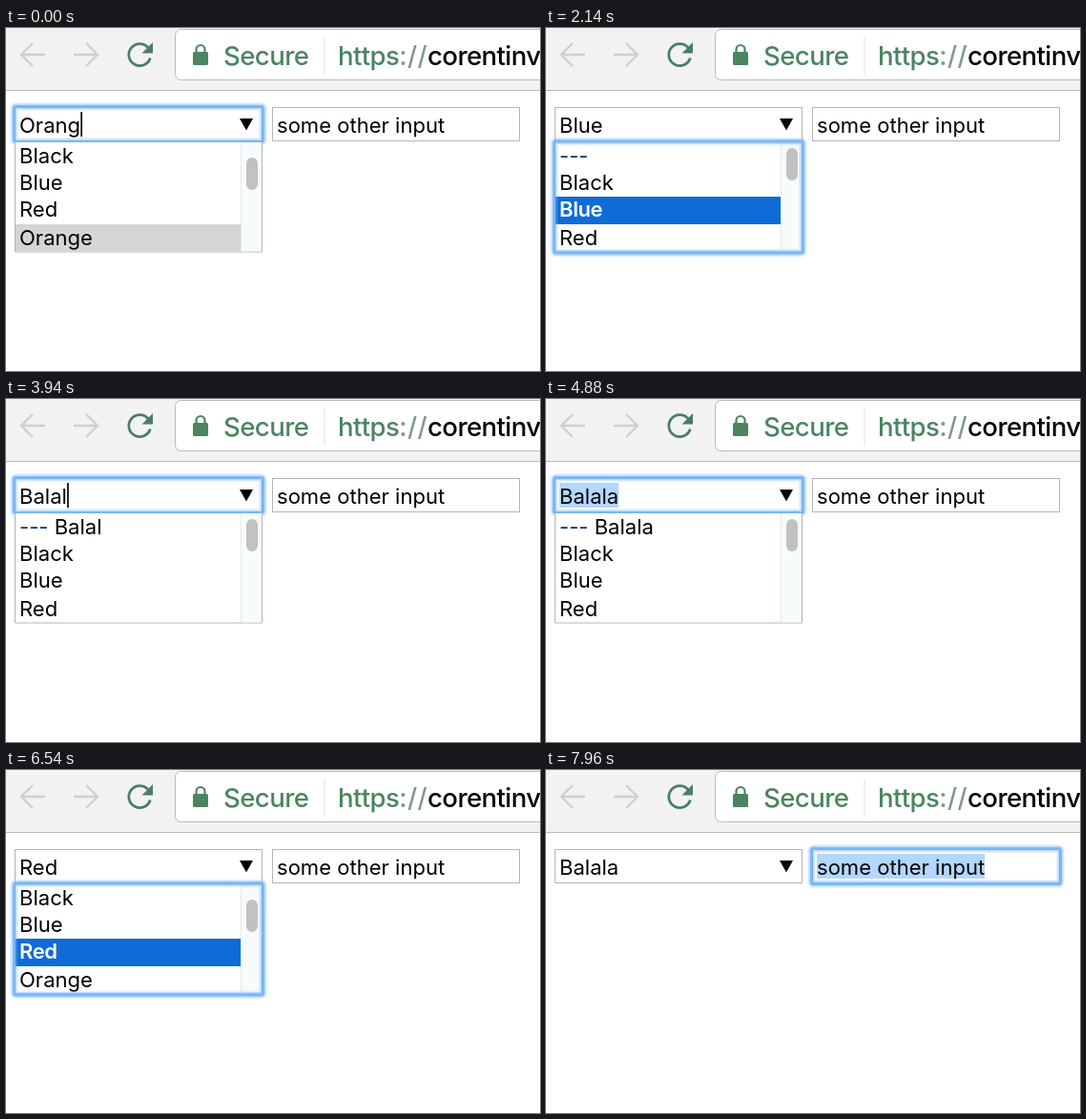
Write an HTML page that moves like this. It is 560 px wide and 360 px high and loops after 8000 ms.

```html
<!DOCTYPE html>
<html lang="en">
<head>
<meta charset="utf-8">
<title>Editable select</title>
<style>
  html, body { margin: 0; width: 100%; height: 100%; overflow: hidden; background: #fff; }
  svg { display: block; width: 560px; height: 360px; }
  text { font: 22.05px Inter, Roboto, sans-serif; white-space: pre; }
  .bar { font-size: 27.6px; font-weight: 500; letter-spacing: -.6px; }
  .bar tspan { letter-spacing: .3px; }
  .on { font-weight: 600; letter-spacing: -.4px; fill: #fff; }
  .dash { fill: #12365f; }
  .on .dash { fill: #fff; }
  .box { fill: #fff; stroke: #b4b4b4; }
  .ring rect { fill: none; stroke: #6fb1f5; }
</style>
</head>
<body>
<svg id="stage" viewBox="0 0 560 360">
  <rect width="560" height="65" fill="#f2f2f2"/>
  <rect y="65" width="560" height="1" fill="#b8b8b8"/>
  <g fill="none" stroke="#cfcfcf" stroke-width="2.4">
    <path d="M41 28H17M28 16L16 28L28 40"/>
    <path d="M71 28H95M84 16L96 28L84 40"/>
  </g>
  <path d="M149 20.500A11.5 11.5 0 1 0 151.3 31.500" fill="none" stroke="#4a7d68" stroke-width="2.700"/>
  <path d="M154 15V26.500H142.500Z" fill="#4a7d68"/>
  <rect x="177.500" y="1.500" width="400" height="53" rx="6" fill="#fff" stroke="#bababa"/>
  <rect x="196" y="25" width="16" height="14" rx="1.500" fill="#4a8560"/>
  <path d="M199.500 26V22.500a4.500 4.500 0 0 1 9 0V26" fill="none" stroke="#4a8560" stroke-width="2.200"/>
  <text class="bar" x="228" y="39" fill="#4a8560">Secure</text>
  <rect x="333.500" y="9" width="1" height="40" fill="#e4e4e4"/>
  <text class="bar" x="348" y="39" fill="#4a8560">https<tspan fill="#7f9a88">://</tspan></text>
  <text class="bar" x="442" y="39">corentinvau</text>

  <rect class="box" x="9.500" y="83.500" width="259" height="35"/>
  <rect class="box" x="279.500" y="83.500" width="259" height="35"/>
  <rect id="pick" y="88" height="26" fill="#b3d7fe"/>
  <text id="value" x="14" y="110"></text>
  <text id="other" x="284" y="110">some other input</text>
  <path d="M245 95H259L252 107.500Z"/>
  <rect id="caret" y="88" width="1.700" height="26"/>

  <g id="list">
    <path class="box" d="M9.500 120V235H268.500V120"/>
    <rect x="246" y="120" width="22" height="114.500" fill="#f7fbfb"/>
    <rect x="246" y="120" width="1" height="114.500" fill="#e3e9e8"/>
    <rect id="thumb" x="252" width="12" height="34" rx="6" fill="#c1c1c1"/>
    <g id="rows"></g>
  </g>
  <g class="ring" id="ring"></g>
</svg>
<script>
const LOOP = 8000;
const NAMES = ['---', 'Black', 'Blue', 'Red', 'Orange'];
const TOPS = [120, 148, 177, 206, 234];
const BASES = [142, 170, 198, 228];
const $ = id => document.getElementById(id);

function add(parent, tag, attrs) {
  const el = document.createElementNS('http://www.w3.org/2000/svg', tag);
  set(el, attrs);
  return parent.appendChild(el);
}
function set(el, attrs) {
  for (const k in attrs) el.setAttribute(k, attrs[k]);
}
function show(el, on) {
  el.style.display = on ? '' : 'none';
}

// Each step changes only the listed fields of the state.
const STEPS = [
  [0, { focus: 'input', text: 'Orang', caret: 1, sel: 0, open: 1, hl: 4, top: 1, own: '' }],
  [140, { caret: 0 }],
  [280, { text: 'Oran', caret: 1 }],
  [440, { text: 'Ora' }],
  [600, { text: 'Or' }],
  [740, { text: 'O' }],
  [880, { text: '', hl: 0, top: 0 }],
  [1040, { caret: 0 }],
  [1180, { caret: 1 }],
  [1340, { text: 'B', hl: 1 }],
  [1480, { text: 'Bl' }],
  [1620, { text: 'Blu', hl: 2 }],
  [1760, { text: 'Blue' }],
  [1900, { caret: 0 }],
  [2040, { focus: 'list' }],
  [2400, { focus: '', open: 0 }],
  [2560, { focus: 'other' }],
  [2800, { focus: 'input', open: 1, sel: 1 }],
  [3300, { text: 'B', sel: 0, caret: 1, hl: 1 }],
  [3480, { text: 'Ba', hl: 0, own: ' Ba' }],
  [3640, { text: 'Bal', own: ' Bal' }],
  [3800, { text: 'Bala', own: ' Bala' }],
  [3940, { text: 'Balal', own: ' Balal' }],
  [4100, { text: 'Balala', own: ' Balala' }],
  [4520, { caret: 0 }],
  [4660, { focus: 'list' }],
  [4860, { focus: 'input', sel: 1 }],
  [5140, { focus: 'list', sel: 0 }],
  [5300, { text: 'Black', hl: 1 }],
  [5420, { text: 'Blue', hl: 2 }],
  [5540, { text: 'Red', hl: 3 }],
  [5640, { text: 'Orange', hl: 4, top: 1 }],
  [5740, { text: 'Red', hl: 3 }],
  [5880, { focus: '', open: 0 }],
  [6000, { focus: 'other' }],
  [6180, { focus: 'input', open: 1, sel: 1 }],
  [6340, { sel: 0, caret: 1 }],
  [6480, { focus: 'list', caret: 0 }],
  [6640, { text: 'Blue', hl: 2 }],
  [6800, { text: 'Black', hl: 1 }],
  [7080, { text: 'Balala', hl: 0, top: 0 }],
  [7360, { focus: '', open: 0 }],
  [7600, { focus: 'other' }]
];
let last = {};
const STATES = STEPS.map(([at, change]) => ({ at, ...(last = { ...last, ...change }) }));

const RINGS = { input: [8.5, 82.5, 261, 37], other: [278.5, 82.5, 261, 37], list: [8.5, 119, 261, 117] };
const halo = [[9, .15], [6, .35], [3, .8]].map(([w, o]) =>
  add($('ring'), 'rect', { rx: 2, 'stroke-width': w, 'stroke-opacity': o }));

const rows = BASES.map((y, i) => {
  const back = add($('rows'), 'rect', { x: 10, y: TOPS[i], width: 236, height: TOPS[i + 1] - TOPS[i] });
  const label = add($('rows'), 'text', { x: 14, y });
  return { back, label, dash: add(label, 'tspan', { class: 'dash' }), word: add(label, 'tspan', {}) };
});

function drawList(s) {
  show($('list'), s.open);
  set($('thumb'), { y: 126 + s.top * 10 });
  rows.forEach((row, i) => {
    const n = i + s.top;
    const active = s.focus === 'list' && n === s.hl;
    const fill = active ? '#0f6cd6' : n && n === s.hl ? '#d5d5d5' : 'none';
    set(row.back, { fill });
    set(row.label, { class: active ? 'on' : '' });
    row.dash.textContent = n ? '' : NAMES[0];
    row.word.textContent = n ? NAMES[n] : s.own;
  });
}

// The open list covers the lower edge of the input's ring.
function drawRing(focus) {
  show($('ring'), focus);
  if (!focus) return;
  $('stage').insertBefore($('ring'), focus === 'list' ? null : $('list'));
  const [x, y, width, height] = RINGS[focus];
  halo.forEach(r => set(r, { x, y, width, height }));
}

function draw(s) {
  $('value').textContent = s.text;
  const width = s.text ? $('value').getComputedTextLength() : 0;
  const away = s.focus === 'other';
  show($('pick'), away || (s.focus === 'input' && s.sel));
  set($('pick'), away
    ? { x: 284, width: $('other').getComputedTextLength() }
    : { x: 14, width });
  show($('caret'), s.focus === 'input' && s.caret && !s.sel);
  set($('caret'), { x: 14.2 + width });
  drawList(s);
  drawRing(s.focus);
}

const start = performance.now();
let shown;
function tick(now) {
  const t = Math.max(0, now - start) % LOOP;
  const s = STATES.filter(step => step.at <= t).pop();
  if (s !== shown) draw(shown = s);
  requestAnimationFrame(tick);
}
tick(start);
</script>
</body>
</html>
```
